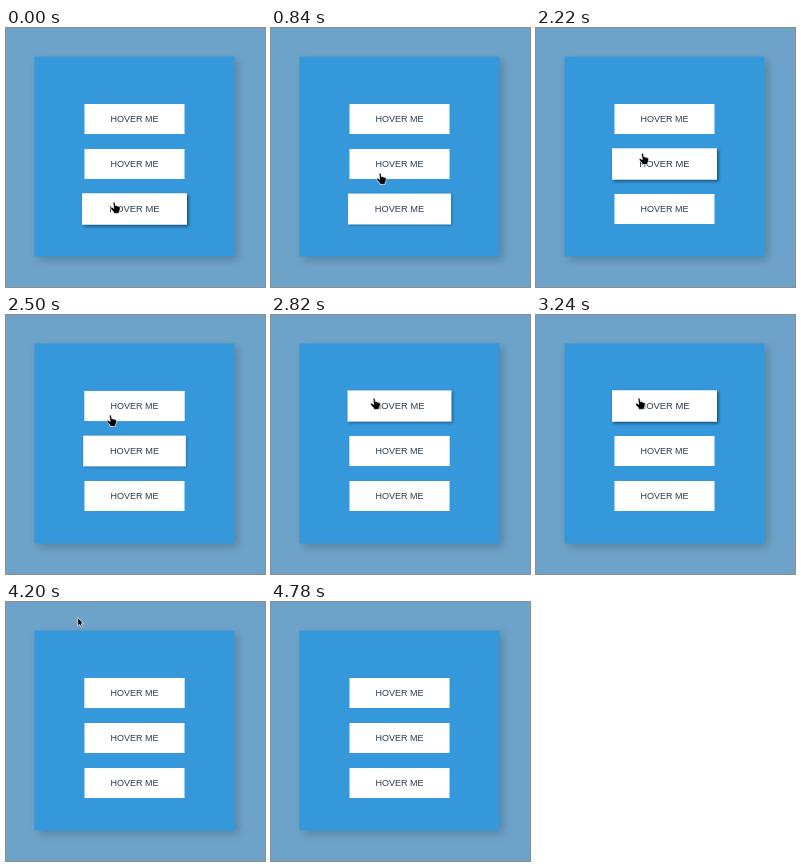
These frames come from a looping animation (259x259 px, 7.86 s). An HTML page:

```html
<!DOCTYPE html>
<html lang="en">
<head>
<meta charset="utf-8">
<title>Hover buttons</title>
<style>
  html, body { margin: 0; width: 100%; height: 100%; overflow: hidden; background: #6ea3c9; }
  svg { display: block; width: 100vw; height: 100vh; }
  text { font: 9px "Liberation Sans", Arial, sans-serif; fill: #2c3e50; text-anchor: middle; }
</style>
</head>
<body>
<svg id="stage" viewBox="0 0 259 259">
  <defs>
    <filter id="soft" x="-20%" y="-20%" width="140%" height="140%"><feGaussianBlur stdDeviation="5"/></filter>
    <filter id="tight" x="-20%" y="-40%" width="140%" height="180%"><feGaussianBlur stdDeviation="1.3"/></filter>
  </defs>
  <rect width="259" height="259" fill="#6ea3c9"/>
  <rect x="32" y="32" width="200" height="200" fill="#000" opacity=".2" filter="url(#soft)"/>
  <rect x="28.5" y="28.5" width="200" height="200" fill="#3498db"/>
  <g id="buttons"></g>
  <g id="cursor" fill="#000" stroke="#fff" stroke-width=".7" stroke-linejoin="round">
    <path id="hand" d="M-1 1C-1-.4.9-.4 1 1L1.5 3.8Q2.6 3.2 3.1 4.1Q4.2 3.6 4.7 4.6Q6 4.3 6.2 5.6Q6.4 8 5.2 9.6L5 11.4H-.2L-.5 9.9L-3.2 6.9Q-4 5.6-2.7 5.2Q-1.8 5.2-.2 6.5Z"/>
    <path id="arrow" d="M0 0V8.4L1.9 6.7L3.2 9.6L4.6 9L3.4 6.2H6Z"/>
  </g>
</svg>
<script>
const LOOP = 7860, HOLD = 840, FADE = 800, CENTER_X = 128.5;
const byId = id => document.getElementById(id);

const buttons = [
  { y: 91, enter: 2430, leave: 3660 },
  { y: 136, enter: 820, leave: 2276 },
  { y: 181, enter: -FADE, leave: 650 }
];

// time, x, y of the pointer tip
const path = [
  [840, 109, 145], [1100, 108.3, 138], [1420, 107.3, 132], [1960, 107.3, 132],
  [2220, 106.5, 125.3], [2680, 103, 84], [2820, 103, 83], [3480, 103, 83],
  [3760, 88.5, 51], [4220, 71, 14], [4320, 71, 14], [4560, 61, -3], [4780, 60, -20]
];

byId("buttons").innerHTML = buttons.map(() => `<g>
  <rect x="-50" y="-15" width="100" height="30" fill="#000" filter="url(#tight)"/>
  <rect x="-50" y="-15" width="100" height="30" fill="#fff"/>
  <text y="3.1">HOVER ME</text></g>`).join("");
buttons.forEach((b, i) => { b.node = byId("buttons").children[i]; });

// CSS "ease": cubic-bezier(.25, .1, .25, 1)
function ease(x) {
  if (x <= 0) return 0;
  if (x >= 1) return 1;
  const curve = (u, a, b) => 3 * a * u * (1 - u) ** 2 + 3 * b * u * u * (1 - u) + u ** 3;
  let low = 0, high = 1;
  for (let i = 0; i < 24; i++) {
    const mid = (low + high) / 2;
    if (curve(mid, .25, .25) < x) low = mid; else high = mid;
  }
  return curve(low, .1, 1);
}

function pointer(t) {
  if (t < HOLD) return [108, 174];
  const i = path.findIndex(p => p[0] > t);
  if (i < 0) return [60, -20];
  const [t0, x0, y0] = path[i - 1], [t1, x1, y1] = path[i];
  const k = (t - t0) / (t1 - t0);
  return [x0 + (x1 - x0) * k, y0 + (y1 - y0) * k];
}

function hover(b, t) {
  if (t < HOLD) return b.enter < 0 ? 1 : 0;
  return ease((t - b.enter) / FADE) - ease((t - b.leave) / FADE);
}

function draw(t) {
  for (const b of buttons) {
    const h = hover(b, t), shadow = b.node.firstElementChild;
    b.node.setAttribute("transform", `translate(${CENTER_X} ${b.y}) scale(${1 + .05 * h})`);
    shadow.setAttribute("transform", `translate(${1.5 * h} ${1.5 * h})`);
    shadow.setAttribute("opacity", .5 * h);
  }
  const [x, y] = pointer(t);
  const over = buttons.some(b => Math.abs(y - b.y) < 15);
  byId("cursor").setAttribute("transform", `translate(${x} ${y})`);
  byId("hand").setAttribute("visibility", over ? "visible" : "hidden");
  byId("arrow").setAttribute("visibility", over ? "hidden" : "visible");
}

const start = performance.now();
function tick() {
  draw((performance.now() - start) % LOOP);
  requestAnimationFrame(tick);
}
tick();
</script>
</body>
</html>
```
